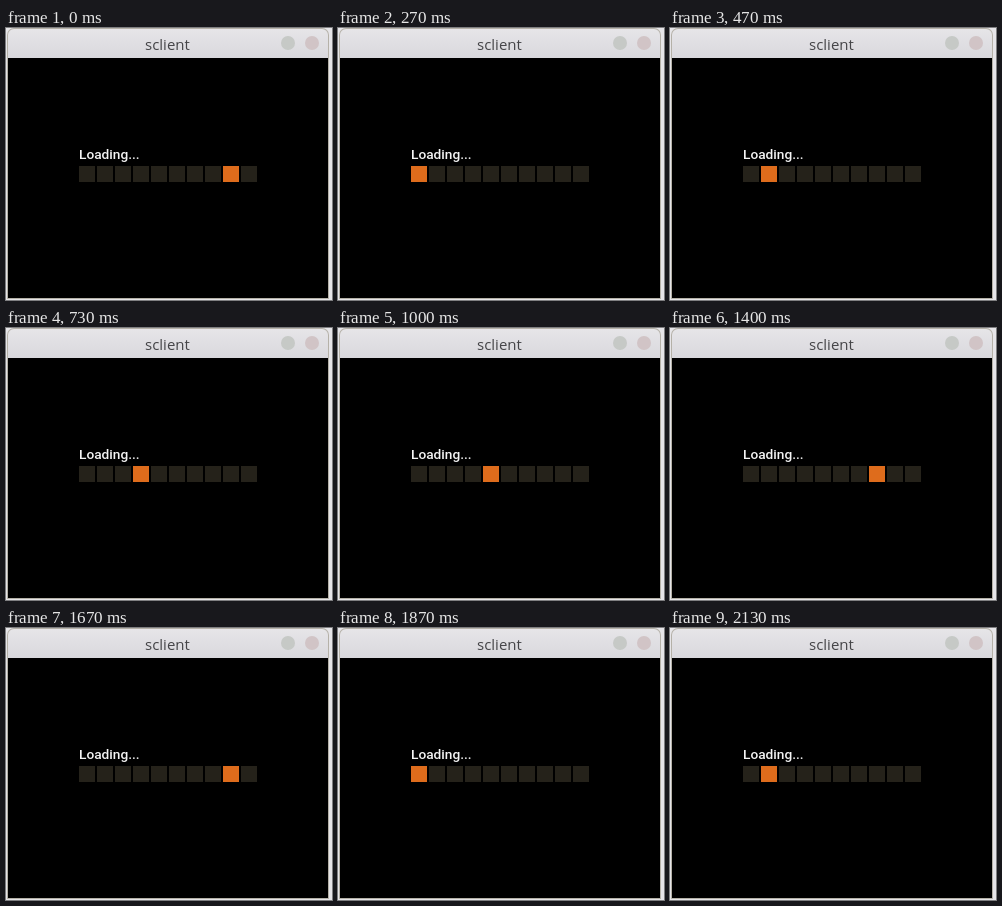
Recreate the animation shown at these times as an HTML page with a canvas. Size 326 by 272 pixels, loop 2.19 s.

```html
<!DOCTYPE html>
<html lang="en">
<head>
<meta charset="utf-8">
<title>Loading</title>
<style>
  html, body { margin: 0; width: 100%; height: 100%; overflow: hidden; background: #e6e5e8; }
  canvas { display: block; }
</style>
</head>
<body>
<canvas id="stage"></canvas>
<script>
const W = 326, H = 272, LOOP = 2190;
const CELLS = 10, PITCH = 18, SIZE = 16, BAR_X = 73, BAR_Y = 138;
const START = 8.68, SPEED = 0.405; // cells, cells per tick

const canvas = document.getElementById('stage');
const dpr = window.devicePixelRatio || 1;
canvas.width = W * dpr;
canvas.height = H * dpr;
canvas.style.width = W + 'px';
canvas.style.height = H + 'px';
const ctx = canvas.getContext('2d');
ctx.scale(dpr, dpr);

function rect(x, y, w, h, color) {
  ctx.fillStyle = color;
  ctx.fillRect(x, y, w, h);
}

function dot(x, y, r, color) {
  ctx.fillStyle = color;
  ctx.beginPath();
  ctx.arc(x, y, r, 0, Math.PI * 2);
  ctx.fill();
}

function label(str, x, y, font, color) {
  ctx.font = font;
  ctx.fillStyle = color;
  ctx.fillText(str, x, y);
}

function frameShape(x, y, w, h, r, fill) {
  ctx.fillStyle = fill;
  ctx.beginPath();
  ctx.roundRect(x, y, w, h, [r, r, 0, 0]);
  ctx.fill();
}

function drawWindow() {
  rect(0, 0, W, H, '#e6e5e8');
  frameShape(1, 0, 322, 271, 7, '#b5b1a8');
  const shade = ctx.createLinearGradient(0, 1, 0, 30);
  shade.addColorStop(0, '#e6e5e8');
  shade.addColorStop(1, '#d9d8dd');
  frameShape(2, 1, 320, 29, 6, shade);
  rect(2, 30, 320, 240, '#000');
  dot(282, 15, 7, '#c6c9c6');
  dot(306, 15, 7, '#d1c4c6');
  label('sclient', 139, 22, '15px "Open Sans", "Noto Sans", sans-serif', '#454548');
}

function drawLoader(active) {
  label('Loading...', 73, 131, '500 13.7px Roboto, sans-serif', '#f4f4f4');
  for (let i = 0; i < CELLS; i++) {
    rect(BAR_X + i * PITCH, BAR_Y, SIZE, SIZE, i === active ? '#de6c1c' : '#25221a');
  }
}

// The clock ticks 15 times a second, rounded to hundredths.
function cellAt(ms) {
  const tick = Math.floor((Math.floor(ms / 10) + 0.5) * 3 / 20);
  return Math.floor(START + SPEED * tick) % CELLS;
}

const t0 = performance.now();
function draw(now) {
  drawWindow();
  drawLoader(cellAt(Math.max(0, now - t0) % LOOP));
  requestAnimationFrame(draw);
}
draw(t0);
</script>
</body>
</html>
```
